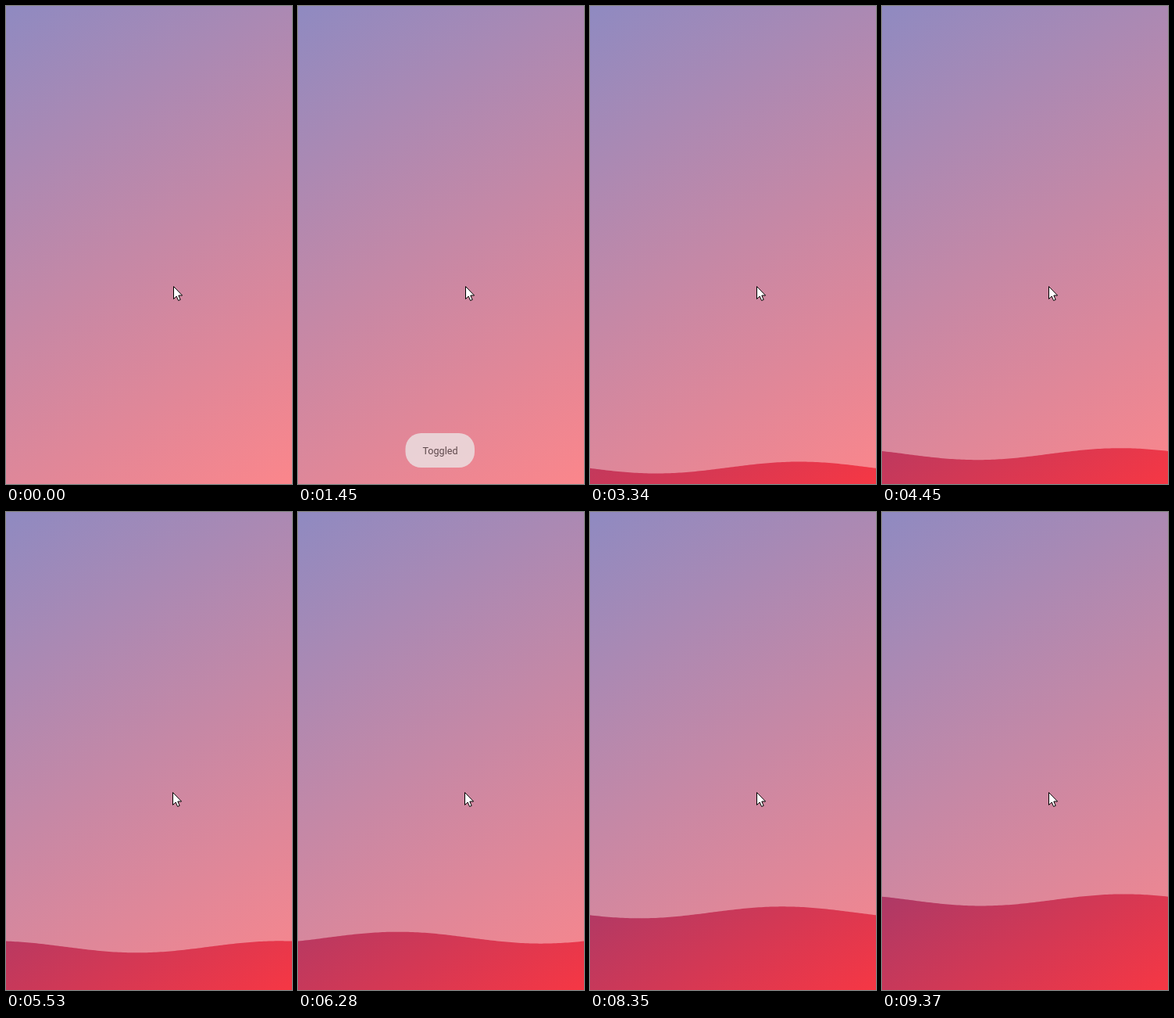
Recreate the animation shown at these times as an HTML page. Size 366x611 px, loop 9400 ms.

```html
<!DOCTYPE html>
<html lang="en">
<head>
<meta charset="utf-8">
<title>Rising wave</title>
<style>
  html, body { margin: 0; width: 100%; height: 100%; overflow: hidden; }
  svg { display: block; width: 366px; height: 611px; }
  #toast { opacity: 0; }
  #toast text { font: 12.6px Roboto, sans-serif; fill: #3d3a3b; text-anchor: middle; }
</style>
</head>
<body>
<svg viewBox="0 0 366 611">
  <defs>
    <linearGradient id="sky" gradientUnits="userSpaceOnUse" x1="0" y1="0" x2="366" y2="611">
      <stop offset="0" stop-color="#8f8ac1"/>
      <stop offset="1" stop-color="#fb868b"/>
    </linearGradient>
    <linearGradient id="sea" gradientUnits="userSpaceOnUse" x1="0" y1="0" x2="366" y2="611">
      <stop offset="0" stop-color="#443c98"/>
      <stop offset="1" stop-color="#f63744"/>
    </linearGradient>
  </defs>
  <rect width="366" height="611" fill="url(#sky)"/>
  <path id="wave" fill="url(#sea)"/>
  <g id="toast">
    <rect x="137.5" y="546" width="88.5" height="44" rx="20" fill="#ebe4e5"/>
    <text x="182" y="573">Toggled</text>
  </g>
  <path id="cursor" d="M.5 .5V16.5L4.2 13L6.6 18.5L9.2 17.4L6.8 12H11.6Z"
        fill="#fff" stroke="#000" transform="translate(214 358)"/>
</svg>
<script>
  const LOOP = 9400, STEP = 30, START = 1250;
  const W = 366, H = 611;
  const AMP = 7.5, RISE = 0.0156, DRIFT = 0.2965;
  const [wave, toast, cursor] = ['wave', 'toast', 'cursor'].map(id => document.getElementById(id));

  const clamp = v => Math.min(1, Math.max(0, v));

  // A sine surface that drifts left while the water level climbs.
  function wavePath(t) {
    const level = 590 - RISE * (t - 3340);
    const crest = 268 - DRIFT * (t - 3340);
    let d = `M0 ${H}`;
    for (let x = 0; x <= W; x += 3) {
      const y = level - AMP * Math.cos((x - crest) / W * 2 * Math.PI);
      d += `L${x} ${Math.min(H, y).toFixed(2)}`;
    }
    return d + `V${H}Z`;
  }

  function draw() {
    const now = performance.now() % LOOP;
    const t = Math.max(0, Math.floor((now - 10) / STEP) * STEP + 10);
    wave.setAttribute('d', t < START ? '' : wavePath(t));
    toast.style.opacity = Math.min(clamp((t - START) / 250), clamp((3100 - t) / 250));
    cursor.setAttribute('transform', `translate(${t < 2700 ? 214 : 213} 358)`);
    requestAnimationFrame(draw);
  }
  draw();
</script>
</body>
</html>
```
